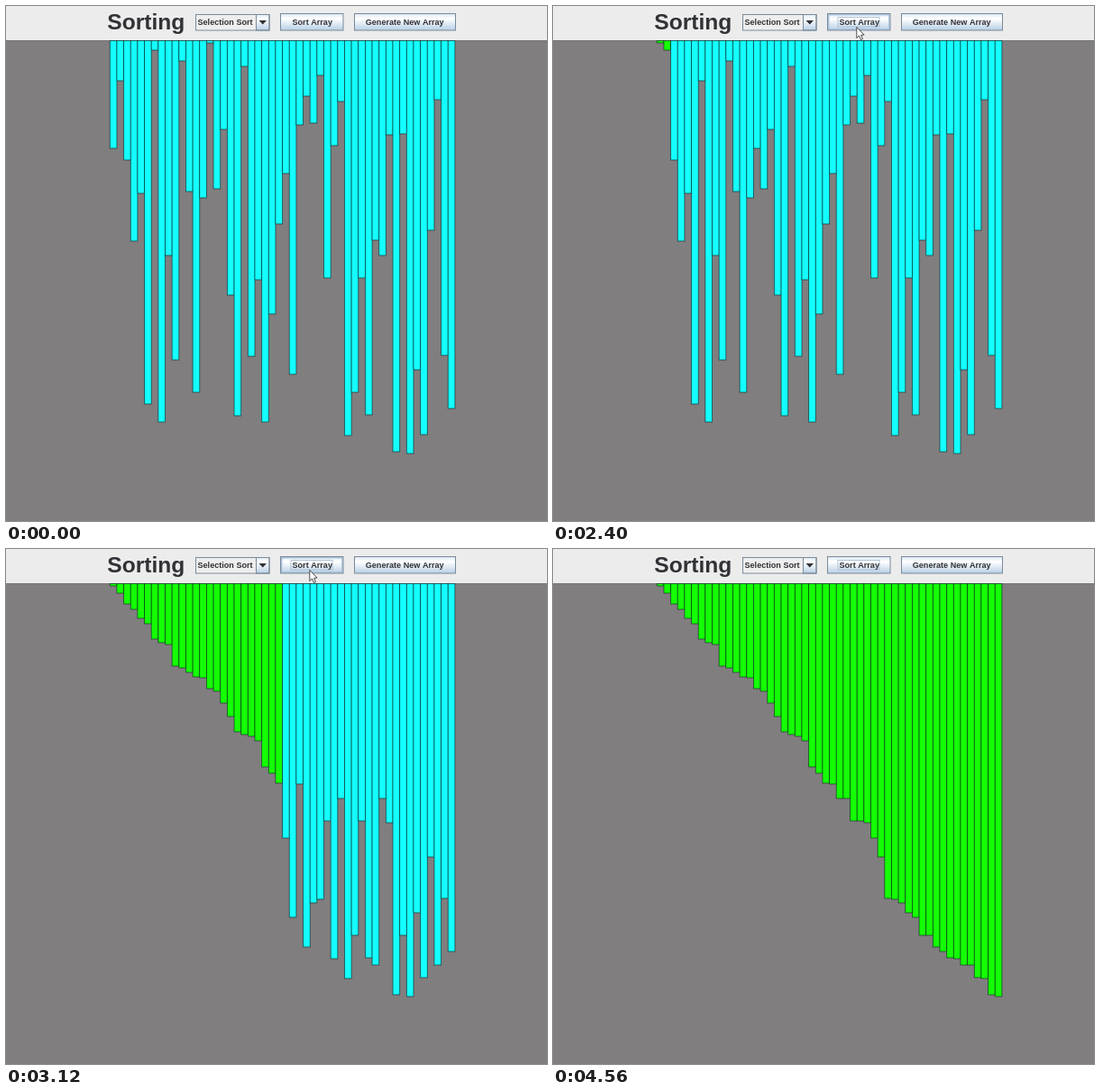
Write an HTML page with a canvas that moves like this. It is 600 px wide and 572 px high and loops after 5040 ms.

```html
<!DOCTYPE html>
<html lang="en">
<head>
<meta charset="utf-8">
<title>Sorting</title>
<style>
  html, body { margin: 0; width: 100%; height: 100%; overflow: hidden; background: #807e7f; }
  canvas { display: block; width: 600px; height: 572px; }
</style>
</head>
<body>
<canvas id="stage" width="600" height="572"></canvas>
<script>
const ctx = document.getElementById('stage').getContext('2d');
const LOOP = 5040, STEP = 40;
const LEFT = 115.3, PITCH = 7.652, TOP = 38.5;
const HOVER_ON = 1000, CURSOR_ON = 2080, CLICK = 2320, LEAVE = 4320;

// lower edge of every bar
const bars = [
  158, 83, 171, 261, 208, 442, 49, 462, 277, 393,
  61, 206, 429, 213, 41, 203, 137, 321, 455, 67,
  389, 304, 462, 342, 242, 186, 409, 132, 100, 130,
  77, 302, 155, 106, 477, 429, 302, 454, 260, 277,
  143, 495, 142, 497, 404, 476, 249, 104, 388, 447
];

// sorting pace: [time, bars in place]
const pace = [[2338, 0], [2400, 2], [2680, 11], [3120, 25], [3800, 44], [4010, 50]];

function sortedCount(t) {
  if (t <= pace[0][0]) return 0;
  for (let i = 1; i < pace.length; i++) {
    const [t0, n0] = pace[i - 1], [t1, n1] = pace[i];
    if (t < t1) return Math.floor(n0 + (n1 - n0) * (t - t0) / (t1 - t0));
  }
  return bars.length;
}

// state of the array after n rounds of selection sort
function selectionSort(n) {
  const a = bars.slice();
  for (let i = 0; i < n; i++) {
    let m = i;
    for (let j = i + 1; j < a.length; j++) if (a[j] < a[m]) m = j;
    [a[i], a[m]] = [a[m], a[i]];
  }
  return a;
}

function label(text, x, y, size) {
  ctx.font = `bold ${size}px "Liberation Sans", Arial, sans-serif`;
  ctx.fillStyle = '#303236';
  ctx.fillText(text, x, y);
}

function frame(x, y, w, h, color, width = 1) {
  ctx.strokeStyle = color;
  ctx.lineWidth = width;
  ctx.strokeRect(x, y, w, h);
}

function glossy(x, y, w, h) {
  const g = ctx.createLinearGradient(0, y, 0, y + h);
  g.addColorStop(0, '#dde8f3');
  g.addColorStop(0.3, '#ffffff');
  g.addColorStop(0.45, '#f0f5fa');
  g.addColorStop(1, '#b8cfe5');
  ctx.fillStyle = g;
  ctx.fillRect(x, y, w, h);
}

function button(text, x, w, textX, hover, focus) {
  glossy(x, 8.5, w, 18.5);
  if (hover) frame(x + 1.2, 9.7, w - 2.4, 16.1, '#a9c2dc', 1.4);
  frame(x, 8.5, w, 18.5, '#7a8a99');
  if (focus) frame(textX - 1.5, 12.5, 46, 10.5, '#a3b8cc', 0.8);
  label(text, textX, 21, 9.1);
}

function combo() {
  ctx.fillStyle = '#eeeeee';
  ctx.fillRect(210, 9, 82, 18);
  glossy(277, 9, 15, 18);
  frame(210.5, 9.5, 81.5, 17.5, '#7a8a99');
  frame(277.5, 9.5, 14.5, 17.5, '#7a8a99');
  label('Selection Sort', 212.5, 21, 9.1);
  ctx.beginPath();
  ctx.moveTo(280.5, 16);
  ctx.lineTo(289, 16);
  ctx.lineTo(284.75, 20.5);
  ctx.fill();
}

function cursor(x, y) {
  ctx.beginPath();
  ctx.moveTo(x, y);
  for (const [dx, dy] of [[0, 12], [2.7, 9.5], [4.7, 14], [6.7, 13.1], [4.8, 8.8], [8.3, 8.5]])
    ctx.lineTo(x + dx, y + dy);
  ctx.closePath();
  ctx.fillStyle = '#fff';
  ctx.fill();
  ctx.strokeStyle = '#222';
  ctx.lineWidth = 0.8;
  ctx.stroke();
}

function drawBars(n) {
  selectionSort(n).forEach((bottom, i) => {
    const x = LEFT + i * PITCH, h = bottom - TOP;
    ctx.fillStyle = i < n ? '#14ff04' : '#14ffff';
    ctx.fillRect(x, TOP, PITCH, h);
    frame(x, TOP, PITCH, h, 'rgba(0,25,25,0.65)', 0.85);
  });
}

function draw(t) {
  ctx.fillStyle = '#807e7f';
  ctx.fillRect(0, 0, 600, 572);
  ctx.fillStyle = '#ececec';
  ctx.fillRect(0, 0, 600, 38);
  ctx.fillStyle = '#747474';
  ctx.fillRect(0, 38, 600, 1);
  label('Sorting', 112.3, 26.3, 24.6);
  combo();
  button('Sort Array', 304.5, 69.5, 317.5, t >= HOVER_ON && t < LEAVE, t >= CLICK);
  button('Generate New Array', 386.5, 112, 398.7, false, false);
  drawBars(sortedCount(t));
  if (t >= CURSOR_ON && t < LEAVE) cursor(336.8, 23.5);
}

const start = performance.now();
function tick() {
  const t = (performance.now() - start) % LOOP;
  draw(Math.floor(t / STEP) * STEP);
  requestAnimationFrame(tick);
}
tick();
</script>
</body>
</html>
```
